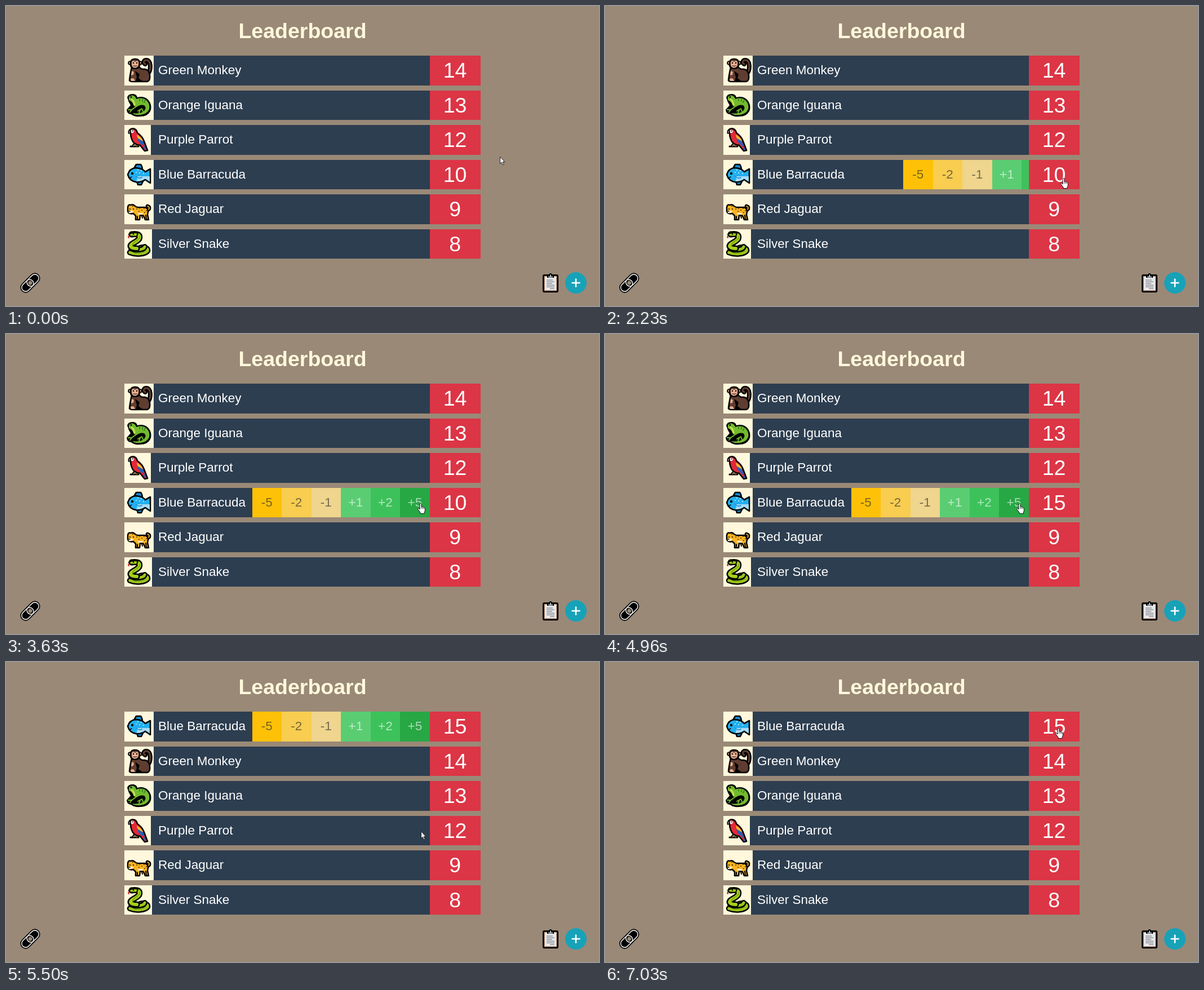
An HTML page for the animation above (8000 ms loop, 1052x532 px).

```html
<!DOCTYPE html>
<html lang="en">
<head>
<meta charset="utf-8">
<title>Leaderboard</title>
<style>
html, body { margin: 0; width: 100%; height: 100%; overflow: hidden; background: #9a8977; }
body { position: relative; font: 22.5px "Liberation Sans", Arial, sans-serif; color: #fff; }
h1 { position: absolute; left: 0; top: 22px; width: 1052px; margin: 0; font-size: 37.5px; line-height: 44px; text-align: center; color: #fff8dc; }
svg { position: absolute; overflow: visible; }

.row {
  --from-y: calc(88.3px + 61.5px * var(--from));
  --to-y: calc(88.3px + 61.5px * var(--to));
  position: absolute; left: 210.4px; top: var(--from-y); width: 631.2px; height: 52.5px;
  line-height: 52.5px; white-space: nowrap; background: #2d3e50;
  animation: reorder 8s infinite;
}
.row.mover { z-index: 1; }
.badge { position: absolute; left: 0; top: 0; height: 100%; background: #fff8dc; }
.badge svg { left: 0; top: 0; }
.name { position: absolute; left: 59.6px; }
.score { position: absolute; right: 0; width: 90px; height: 100%; overflow: hidden; background: #dc3545; font-size: 37.5px; text-align: center; }
.score div { position: relative; }
.score span { display: block; height: 52.5px; }
.mover .score div { animation: count 8s step-end infinite; }

.panel { position: absolute; right: 90px; width: 0; height: 100%; overflow: hidden; animation: slide 8s infinite; }
.panel div { display: flex; width: 315px; }
.panel b { flex: none; width: 52.5px; height: 52.5px; font-weight: normal; text-align: center; color: #fff9; }
.panel b.minus { color: #21252999; }

#cursor { position: absolute; left: 0; top: 0; z-index: 2; animation: point 8s ease-in-out infinite; }
#arrow { animation: arrow 8s step-end infinite; }
#hand { left: -6px; animation: hand 8s step-end infinite; }

@keyframes reorder {
  0%, 63.96% { top: var(--from-y); animation-timing-function: ease; }
  68.96%, 100% { top: var(--to-y); }
}
@keyframes slide {
  0%, 26.06% { width: 0; animation-timing-function: ease; }
  30.44%, 85.81% { width: 315px; animation-timing-function: ease-in-out; }
  87.75%, 100% { width: 0; }
}
@keyframes count {
  0% { top: 0; }
  54.45% { top: -52.5px; }
  56.2% { top: -105px; }
  57.85% { top: -157.5px; }
  60.35% { top: -210px; }
  61.95%, 100% { top: -262.5px; }
}
@keyframes point {
  0%, 5.9% { transform: translate(876px, 267px); }
  12.8%, 15% { transform: translate(816px, 305px); }
  16.9%, 36.4% { transform: translate(814px, 305px); animation-timing-function: ease-in; }
  41% { transform: translate(776px, 307px); animation-timing-function: ease-out; }
  45.3%, 68.9% { transform: translate(736px, 300px); }
  74.6% { transform: translate(832px, 241px); }
  82.8%, 100% { transform: translate(805px, 117px); }
}
@keyframes arrow {
  0% { opacity: 1; }
  9.8% { opacity: 0; }
  67.5% { opacity: 1; }
  70.5%, 100% { opacity: 0; }
}
@keyframes hand {
  0% { opacity: 0; }
  9.8% { opacity: 1; }
  67.5% { opacity: 0; }
  70.5%, 100% { opacity: 1; }
}
</style>
</head>
<body>
<h1>Leaderboard</h1>
<div id="board"></div>

<svg style="left:26px;top:474px" width="34" height="34" fill="none">
  <g id="links" transform="rotate(-45 17 17)"></g>
</svg>
<svg style="left:952px;top:474px" width="28" height="34">
  <rect y="2" width="28" height="32" rx="3"/>
  <rect x="2.5" y="4.5" width="23" height="27" rx="1" fill="#b08a70"/>
  <rect x="4" y="6" width="20" height="24" fill="#e8e9ec"/>
  <path d="M8 8V4h3q0-4 3-4t3 4h3v4z"/>
  <path d="M10 6.5h8M14 2.5v3" stroke="#b8bec5" stroke-width="2"/>
  <path d="M7 12h11M7 15h14M7 18h10M7 21h14M7 24h14M13 27h8" stroke="#62676d" stroke-width="1.2"/>
</svg>
<svg style="left:991.5px;top:472px" width="38" height="38">
  <circle cx="19" cy="19" r="19" fill="#17a2b8"/>
  <path d="M11.5 19h15M19 11.5v15" stroke="#fff" stroke-width="2.6"/>
</svg>

<div id="cursor">
  <svg id="arrow" width="10" height="16"><path d="M.5.5v12.2l2.7-2.5 2 4.6 2-.9-2-4.4h3.6z" fill="#fff" stroke="#222"/></svg>
  <svg id="hand" width="14" height="19"><path d="M4 11V2a1.5 1.5 0 0 1 3 0v4.5c1-.6 2-.3 2.3.5 1-.4 1.9 0 2.2.8 1-.2 1.8.4 1.8 1.5V13q0 2-1.3 3.5v2H5.3V17Q3.5 15 2.5 13 1 11.5.7 10.5.5 9.3 1.6 9 3 9 4 11z" fill="#fff" stroke="#111"/><path d="M7 6.5V10M9.3 7.5V10M11.4 8.5V10" stroke="#111" stroke-width=".8"/></svg>
</div>

<script>
const line = (d, color, width) =>
  `<path d="${d}" fill="none" stroke="${color}" stroke-width="${width}" stroke-linecap="round" stroke-linejoin="round"/>`;
const tube = (d, color, width) => line(d, '#000', width + 5) + line(d, color, width);
const shape = (d, color, outline = 2.6) =>
  `<path d="${d}" fill="${color}" stroke="#000" stroke-width="${outline}" stroke-linejoin="round"/>`;
const fill = (d, color) => `<path d="${d}" fill="${color}"/>`;
const dots = (points, r, color) =>
  points.map(([x, y]) => `<circle cx="${x}" cy="${y}" r="${r}" fill="${color}"/>`).join('');

const icons = {
  monkey:
    tube('M42 32C48 24 47 8 39 8C34 8 33 13 37 15', '#5f3d31', 3) +
    shape('M13 21Q10 34 9 44Q10 46 14 46H40Q46 45 45 35Q44 25 36 24Q30 25 26 20z', '#603d31') +
    fill('M19 27L27 33L25 40L32 45H20L22 38z', '#000') +
    fill('M11 42Q16 37 19 45H12zM13 27L17 29L16 34L12 35z', '#e6ad8d') +
    dots([[10, 13], [28, 13]], 3.8, '#000') + dots([[10, 13], [28, 13]], 1.9, '#e6ad8d') +
    shape('M11 13Q11 6 19 6T27 13Q28 23 19 23T11 13z', '#6b4436', 2.4) +
    fill('M13 13Q13 9 16 9.5L19 11L22 9.5Q25 9 25 13Q25 21 19 21.5T13 13z', '#e9b08f') +
    dots([[16, 13], [22, 13]], 1.2, '#000') + line('M16 18Q19 19.5 22 18', '#000', 1),
  iguana:
    fill('M5 12Q7 5 16 6Q22 7 23 12Q34 9 42 16Q49 24 47 34Q43 46 28 46Q17 47 12 42Q5 42 4 34L11 26Q7 20 5 12z', '#000') +
    fill('M8 12Q10 8 15 8.5Q20 10 21 15Q33 11 40 18Q46 25 44 33Q40 42 28 43Q18 44 14 40Q28 42 35 36Q40 30 35 26Q28 24 22 29Q17 29 15 23Q12 18 8 17z', '#72ba2e') +
    line('M27 14V18M32 14V19M37 17L35 21', '#3e8520', 1.8) +
    line('M13 16Q17 18 18 25', '#d3df55', 3) +
    line('M20 29L13 34L7 34M13 34L10 38M24 36L31 32L33 37M28 35L26 39', '#72ba2e', 2) +
    dots([[12, 11.5]], 1.4, '#000'),
  parrot:
    shape('M9 9Q13 5 18 7Q22 9 23 14Q32 20 35 29L41 45L36 46L28 36Q16 35 13 25Q11 20 11 14z', '#e62735') +
    fill('M22 17Q30 21 33 28L30 30Q23 26 22 17z', '#f6bb20') +
    fill('M23 23L33 29L35 35L30 35Q24 30 23 23z', '#245eb8') +
    line('M34 36L38 44', '#245eb8', 2) +
    fill('M11 9Q17 7 17 12Q15 15 12 14z', '#fff') + dots([[14.5, 10.5]], 1.1, '#000') +
    shape('M11 9Q6 9 7.5 15L11 14z', '#777', 1.5) +
    line('M11 38H25M17 34L15 37M22 35V38', '#000', 3.2) + line('M17 35L16 37.5M22 36V38', '#d89420', 1.3),
  fish:
    shape('M17 15L21 8H29Q32 12 32 18zM22 37L24 44H30L34 36z', '#168bd8') +
    shape('M6 26Q9 15 20 14Q31 14 37 21L46 16V41L37 35Q30 40 20 39Q9 37 6 26z', '#21afef') +
    fill('M22 29H45V38.5L37 33Q30 38.5 21 38Q24 34 22 29z', '#a9daf2') +
    line('M21 29Q26 34 31 31', '#168bd8', 1.6) +
    dots([[24, 18], [30, 19], [27, 23], [34, 24], [21, 22]], 1, '#d8f4ff') +
    dots([[14, 24]], 2.2, '#000') + line('M8 31Q11 32 13 30', '#000', 1.3),
  jaguar:
    tube('M41 28C45 26 45 22 41 21', '#fbb41f', 1.8) +
    shape('M6 23Q7 17 11 19Q16 17 19 21L23 23H36Q42 24 42 31L41 36L43 45H37L34 38L28 37L27 45H20V38L16 34Q7 36 6 29z', '#fbb41f', 2.5) +
    line('M23 39V44M38 37L39 44M31 38L32 42', '#000', 2) +
    fill('M7 30Q12 27 16 30Q13 34 8 33zM24 33H34L31 36H25z', '#fff0cf') +
    dots([[22, 26], [27, 25], [31, 28], [35, 25], [39, 29], [26, 30], [36, 32], [15, 21]], 1.1, '#53300e') +
    dots([[10, 26], [16, 26]], 1.1, '#000') + line('M8 30H10', '#000', 1.6),
  snake:
    line('M9 11L7 13L8 15', '#c92432', 2) +
    tube('M10 41C20 45 37 44 41 38C42 33 34 31 28 33', '#9fc618', 5.5) +
    tube('M12 34C20 38 35 36 36 31', '#9fc618', 5) +
    tube('M13 9C23 7 29 10 26 17C22 23 11 25 11 30Q13 34 22 34', '#a8d016', 6) +
    line('M27 12Q28 17 22 20T14 28M17 42Q29 44 38 38', '#6f9f18', 1.4) +
    shape('M8 9Q15 4 24 7L22 12.5L11 12.5z', '#a8d016', 2) + dots([[16, 8.5]], 1.2, '#000'),
};

const players = [
  ['Green Monkey', 14, 'monkey', 51.3, 1],
  ['Orange Iguana', 13, 'iguana', 51.3, 2],
  ['Purple Parrot', 12, 'parrot', 46.5, 3],
  ['Blue Barracuda', 10, 'fish', 51.3, 0],
  ['Red Jaguar', 9, 'jaguar', 51.3, 4],
  ['Silver Snake', 8, 'snake', 49, 5],
];
const steps = [['-5', '#ffc107'], ['-2', '#f8cd50'], ['-1', '#efd58d'], ['+1', '#5acd73'], ['+2', '#3dc25b'], ['+5', '#28a745']];
const panel = `<div class="panel"><div>${steps.map(([label, color]) =>
  `<b class="${label < 0 ? 'minus' : ''}" style="background:${color}">${label}</b>`).join('')}</div></div>`;

board.innerHTML = players.map(([name, score, icon, width, to], from) => {
  const moves = to < from;
  const scores = moves ? steps.map((_, i) => score + i) : [score];
  return `<div class="row ${moves ? 'mover' : ''}" style="--from:${from};--to:${to}">
    <div class="badge" style="width:${width}px"><svg width="52" height="52">${icons[icon]}</svg></div>
    <div class="name">${name}</div>${moves ? panel : ''}
    <div class="score"><div>${scores.map(n => `<span>${n}</span>`).join('')}</div></div>
  </div>`;
}).join('');

const capsule = (x, y, w, h, paint) =>
  `<rect x="${x}" y="${y}" width="${w}" height="${h}" rx="${h / 2}" ${paint}/>`;
const ring = 'stroke="#e5e5e5" stroke-width="1.6"';
links.innerHTML = capsule(-4, 7.5, 42, 19, 'fill="#000"') +
  capsule(-1.5, 10, 24, 14, ring) + capsule(11.5, 10, 24, 14, ring) +
  '<circle cx="17" cy="17" r="3.5" fill="#9a8977"/>';
</script>
</body>
</html>
```
